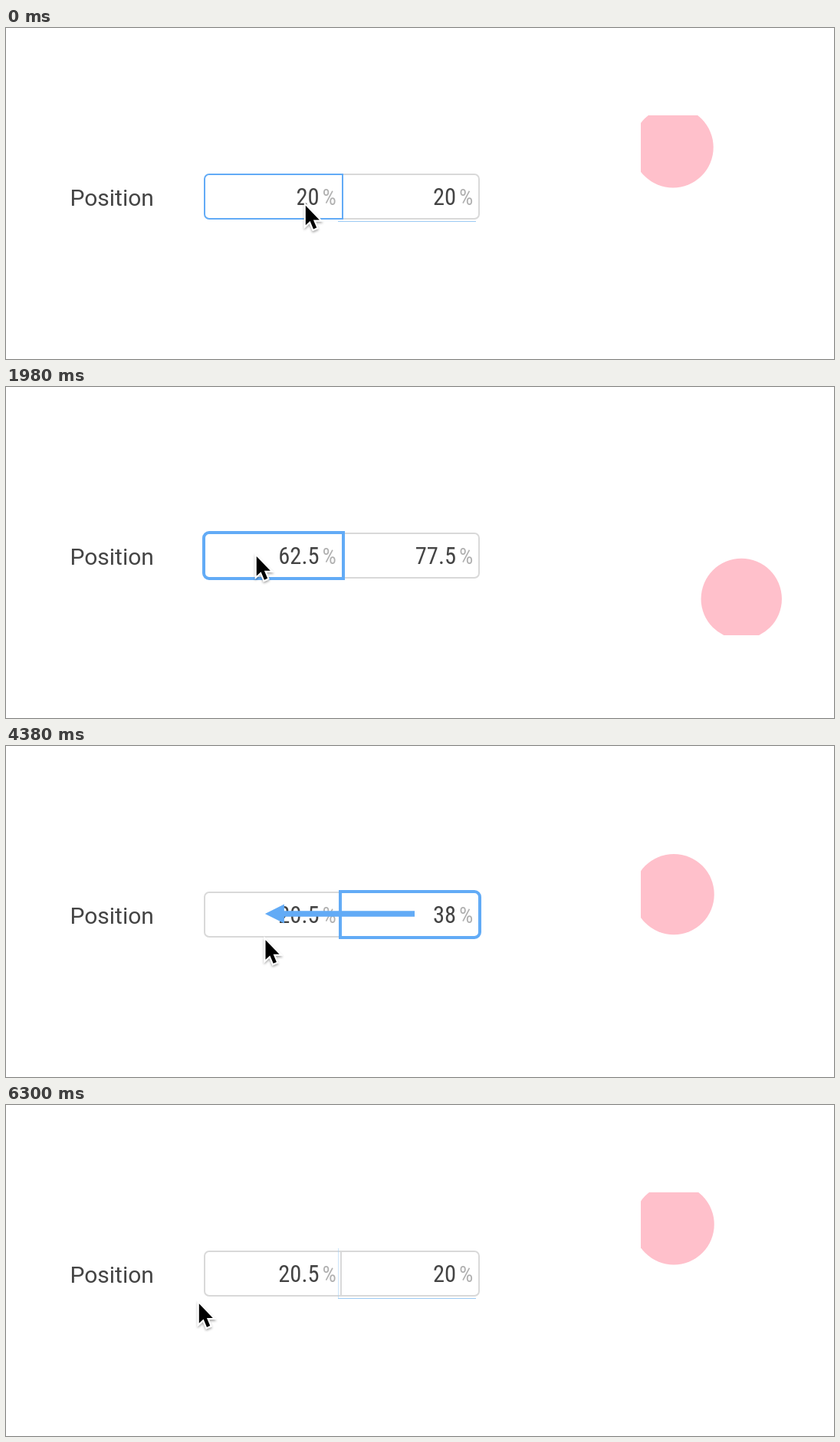
These frames come from a looping animation (1080 by 432 pixels, 6.36 s). An HTML page:

```html
<!DOCTYPE html>
<html lang="en">
<head>
<meta charset="utf-8">
<title>Position fields</title>
<style>
  html, body { margin: 0; width: 100%; height: 100%; overflow: hidden; background: #fff; }
  svg { display: block; width: 1080px; height: 432px; }
  text { font: 30px Roboto, sans-serif; fill: #444; }
  .value, .unit { font-family: "Roboto Condensed", Roboto, sans-serif; font-stretch: 75%; font-size: 30.5px; }
  .value { text-anchor: end; }
  .unit { fill: #b0b0b0; font-size: 29px; }
  .field { fill: #fff; stroke: #d9d9d9; stroke-width: 2; }
  .field.hover { stroke: #62abf6; }
  .field.active { stroke: #62abf6; stroke-width: 4; }
  .trace { fill: none; stroke: #9ccbf5; }
</style>
</head>
<body>
<svg viewBox="0 0 1080 432">
  <defs>
    <clipPath id="area"><rect x="828" y="114" width="210" height="210"/></clipPath>
    <filter id="shade" x="-50%" y="-50%" width="200%" height="200%">
      <feDropShadow dx="0" dy="2" stdDeviation="1.6" flood-opacity=".35"/>
    </filter>
  </defs>
  <text x="83.5" y="232">Position</text>
  <g id="fields">
    <path class="field"/>
    <path class="field"/>
  </g>
  <text class="value" x="408.5" y="231"></text>
  <text class="unit" x="412.5" y="230.5">%</text>
  <text class="value" x="587" y="231"></text>
  <text class="unit" x="591" y="230.5">%</text>
  <path class="trace" id="under" d="M433 252.5H613"/>
  <path class="trace" id="side" d="M433.5 187V252" stroke-opacity=".5"/>
  <g clip-path="url(#area)"><circle id="dot" r="52.7" fill="#ffc0cb"/></g>
  <path id="arrow" fill="#62abf6"/>
  <path id="cursor" d="M0 0V25.5L5.8 20.2L10.2 30.6L14.4 28.8L10.1 18.6H18Z"
    stroke="#fff" stroke-width="4" paint-order="stroke" filter="url(#shade)"/>
</svg>
<script>
const LOOP = 6360, STEP = 60, GAIN = 4.94;
const $ = id => document.getElementById(id);
const boxes = [...document.querySelectorAll('.field')];
const values = document.querySelectorAll('.value');

const ramp = (t, a, b) => Math.min(1, Math.max(0, (t - a) / (b - a)));
const smooth = (t, a, b) => { const k = ramp(t, a, b); return k * k * (3 - 2 * k); };
const mix = ([a, b], k) => a + (b - a) * k;

// Each drag: value range v, cursor range x and y, arrow tail, progress over time.
const drags = [
  { field: 0, from: 60, to: 660, v: [20, 63], x: [389, 605], y: [230, 243], tail: 348,
    progress: t => smooth(t, 0, 600) },
  { field: 1, from: 780, to: 1560, v: [20, 77.5], x: [537, 825], y: [222, 212], tail: 528,
    progress: t => 1 - (1 - ramp(t, 780, 1440)) ** 1.75 },
  { field: 0, from: 1920, to: 3120, v: [63, 20.5], x: [327, 161], y: [219, 239], tail: 368,
    progress: t => 1.094 * smooth(t, 1940, 2580) - .094 * smooth(t, 2580, 2940) },
  { field: 1, from: 3660, to: 6180, v: [77.5, 20], x: [527, 250], y: [238, 257.5], tail: 533, lift: 50,
    progress: t => .687 * smooth(t, 3660, 4380) + .313 * ramp(t, 4380, 5565) }
];

const snap = v => Math.round(v * 2) / 2;
const spot = (d, t) => [mix(d.x, d.progress(t)), mix(d.y, d.progress(t))];

// The pointer follows a drag, then glides to the start of the next one.
function pointer(t) {
  const i = Math.max(0, drags.findLastIndex(d => t >= d.from));
  const now = drags[i], next = drags[i + 1];
  const [x, y] = spot(now, t);
  if (t < now.to || !next) return [x, y];
  const k = smooth(t, now.to, next.from);
  const lift = (next.lift || 0) * Math.sin(Math.PI * k);
  return [mix([x, next.x[0]], k), mix([y, next.y[0]], k) - lift];
}

function boxPath(side, active) {
  const grow = active ? 0 : -1, r = 6 + !!active;
  const l = (side ? 436 : 258) - grow, w = 182 + 2 * grow;
  const top = 190 - grow, h = 60 + 2 * grow, s = side ? -1 : 1, sweep = side ? 0 : 1;
  const open = side ? l : l + w, end = side ? l + w : l;
  return `M${open} ${top}V${top + h}H${end + s * r}a${r} ${r} 0 0 ${sweep} ${-s * r} ${-r}` +
    `V${top + r}a${r} ${r} 0 0 ${sweep} ${s * r} ${-r}Z`;
}

function arrowPath(tail, tip) {
  if (Math.abs(tip - tail) < 25) return '';
  const head = tip - Math.sign(tip - tail) * 25;
  return `M${tail} 215.3H${head}V206.5L${tip} 219L${head} 231.5V222.7H${tail}Z`;
}

function draw(now) {
  const t = Math.floor(now % LOOP / STEP) * STEP;
  const [cx, cy] = pointer(t);
  const drag = drags.find(d => t >= d.from && t < d.to);
  const inside = cy > 190 && cy < 250 && cx > 258 && cx < 618;
  const over = inside ? +(cx > 438) : -1;
  const front = drag ? drag.field : inside ? over : 1;

  const pos = [20, 20];
  for (const d of drags) if (t >= d.from) pos[d.field] = snap(mix(d.v, d.progress(t)));

  boxes.forEach((box, i) => {
    const active = drag && drag.field === i;
    box.setAttribute('class', 'field' + (active ? ' active' : !drag && over === i ? ' hover' : ''));
    box.setAttribute('d', boxPath(i, active));
    values[i].textContent = pos[i];
  });
  if ($('fields').lastElementChild !== boxes[front]) $('fields').append(boxes[front]);

  $('dot').setAttribute('cx', 828 + 2.1 * pos[0]);
  $('dot').setAttribute('cy', 113.8 + 2.1 * pos[1]);
  $('arrow').setAttribute('d', drag ? arrowPath(drag.tail, drag.tail + (pos[drag.field] - drag.v[0]) * GAIN) : '');
  $('cursor').setAttribute('transform', `translate(${cx + 1.8} ${cy + 1.8})`);

  const resting = t >= drags[3].to;
  $('under').style.display = resting || t < drags[0].from ? '' : 'none';
  $('side').style.display = resting ? '' : 'none';
}

function tick() {
  draw(performance.now());
  requestAnimationFrame(tick);
}
tick();
</script>
</body>
</html>
```
